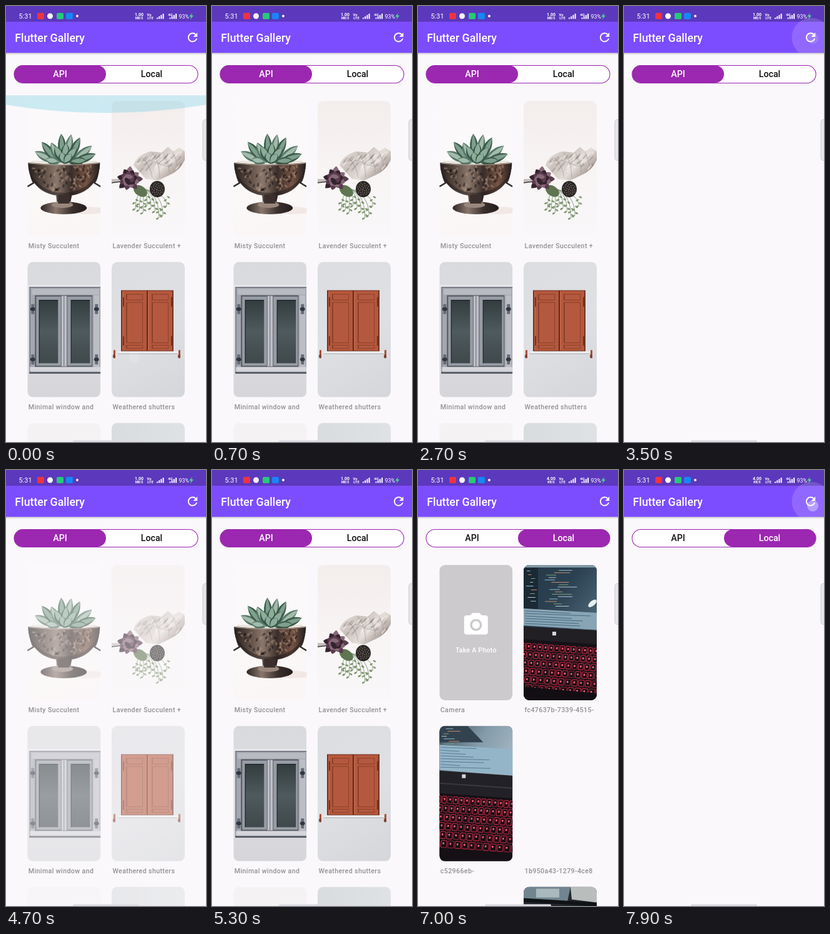
Write an HTML page with a canvas that moves like this. It is 320x693 px and loops after 8 s.

```html
<!DOCTYPE html>
<html lang="en">
<head>
<meta charset="utf-8">
<title>Flutter Gallery</title>
<style>
html, body { margin: 0; height: 100%; overflow: hidden; background: #faf8fb; }
canvas { display: block; width: 320px; height: 693px; }
</style>
</head>
<body>
<canvas id="stage"></canvas>
<script>
const LOOP = 8000, W = 320, H = 693, CARD_W = 117, CARD_H = 215;
const PURPLE = '#9c27b0', FADE = 700;
const canvas = document.getElementById('stage');
const dpr = window.devicePixelRatio || 1;
canvas.width = W * dpr;
canvas.height = H * dpr;
const ctx = canvas.getContext('2d');

const clamp = v => Math.max(0, Math.min(1, v));
const smooth = v => v * v * (3 - 2 * v);
const noise = n => { const v = Math.sin(n * 12.9898) * 43758.5453; return v - Math.floor(v); };

function rect(x, y, w, h, color, r = 0) {
  ctx.fillStyle = color;
  ctx.beginPath();
  ctx.roundRect(x, y, w, h, r);
  ctx.fill();
}
function oval(x, y, rx, ry, color, angle = 0) {
  ctx.fillStyle = color;
  ctx.beginPath();
  ctx.ellipse(x, y, rx, ry, angle, 0, 7);
  ctx.fill();
}
function shape(d, color, rule) {
  ctx.fillStyle = color;
  ctx.fill(new Path2D(d), rule || 'nonzero');
}
function line(d, color, width = 1) {
  ctx.strokeStyle = color;
  ctx.lineWidth = width;
  ctx.stroke(new Path2D(d));
}
function text(str, x, y, size, color, { weight = 500, align = 'left', spacing = 0 } = {}) {
  ctx.font = `${weight} ${size}px Roboto, sans-serif`;
  ctx.textAlign = align;
  ctx.letterSpacing = spacing + 'px';
  ctx.fillStyle = color;
  ctx.fillText(str, x, y);
}
function shade(x0, y0, x1, y1, ...colors) {
  const g = ctx.createLinearGradient(x0, y0, x1, y1);
  colors.forEach((c, i) => g.addColorStop(i / (colors.length - 1), c));
  return g;
}
function icon(d, x, y, scale, color) {
  ctx.save();
  ctx.translate(x, y);
  ctx.scale(scale, scale);
  shape(d, color, 'evenodd');
  ctx.restore();
}
function leaf(x0, y0, x1, y1, width, color) {
  const len = Math.hypot(x1 - x0, y1 - y0);
  const nx = -(y1 - y0) / len * width, ny = (x1 - x0) / len * width;
  const mx = x0 + (x1 - x0) * .6, my = y0 + (y1 - y0) * .6;
  shape(`M${x0} ${y0}Q${mx + nx} ${my + ny} ${x1} ${y1}Q${mx - nx} ${my - ny} ${x0} ${y0}`, color);
}

// Photos, each drawn inside a 117 x 215 card
function pot() {
  rect(0, 0, 117, 215, shade(0, 0, 60, 215, '#fbf9fa', '#fbf9f9', '#faf6f5'));
  oval(92, 174, 34, 6, '#f1e8e5');
  line('M3 106Q6 124 10 130L0 136M114 106Q112 124 107 130L117 136', '#332c2c', 2.5);
  rect(5, 95, 107, 6, '#e9e5df', 3);
  const tips = [[12, 80], [23, 65], [38, 66], [54, 52], [70, 53], [84, 58], [103, 71], [109, 84], [30, 92], [93, 93]];
  tips.forEach(([x, y], i) => {
    leaf(58 + (x - 58) * .25, 99, x, y, 13, i % 2 ? '#3c5a4b' : '#57796a');
    leaf(58 + (x - 58) * .32, 96, x, y + 1, 7, i % 2 ? '#7e9f8c' : '#a3bbab');
  });
  [[44, 72], [62, 67], [78, 74], [54, 82], [70, 84]].forEach(([x, y]) => {
    leaf(59, 100, x, y, 14, '#385847');
    leaf(59, 98, x, y, 9, '#8dac99');
  });
  shape('M1 98Q58 104 116 98C116 124 100 145 71 150L69 160H47L46 150C17 145 1 124 1 98Z',
    shade(0, 0, 117, 0, '#231d1e', '#57483f', '#8b786c', '#3b2e2a', '#765545', '#1f1a1b'));
  shape('M3 112Q20 145 58 146Q96 145 114 112Q104 146 71 150L69 160H47L46 150Q12 146 3 112Z', '#1c171877');
  oval(58, 170, 37, 10, shade(20, 0, 96, 0, '#2a2323', '#8a766b', '#3a302d', '#221c1d'));
  oval(56, 165, 17, 5, '#99877d');
  rect(49, 149, 18, 14, '#3a2f2c');
  for (let i = 0; i < 80; i++) {
    const y = 104 + noise(i) * 38, reach = 52 - (y - 104) * .7;
    oval(58 + (noise(i + 90) * 2 - 1) * reach, y, 3, 1.6, i % 2 ? '#c0a08a66' : '#14101177', noise(i + 200) * 3);
  }
  line('M2 99Q58 105 115 99', '#b5a195');
}
function shell() {
  rect(0, 0, 117, 215, shade(0, 0, 0, 215, '#f3edec', '#f8f4f4', '#f9f7f9'));
  shape('M35 102Q40 86 62 80L80 82 90 73 99 80 108 74 117 80V94Q108 112 92 118L75 126 55 124Z',
    shade(45, 75, 95, 125, '#e6e0dc', '#cbc2bc', '#e4ddd8', '#a3958f'));
  for (let i = 0; i < 45; i++) {
    const x = 44 + noise(i) * 66, y = 86 + noise(i + 60) * 24 + (80 - x) * .12;
    oval(x, y, 5, 1.2, i % 2 ? '#f6f1ee99' : '#83787466', 2.3);
  }
  line('M42 98Q56 90 72 98T98 102M64 82Q76 94 77 121M82 82Q92 96 92 114M98 82Q104 92 105 104M48 90Q62 101 65 122', '#80757355', 1.2);
  rect(0, 124, 17, 5, '#c6bebb');
  line('M0 130L16 128', '#3c3739', 1.5);
  for (let i = 0; i < 9; i++) {
    const x = 38 + i * 6.3, y = 162 + noise(i + 4) * 24;
    line(`M52 140Q${x} 148 ${x} ${y}`, '#71896a', .8);
    for (let k = 0; k < 4; k++) leaf(x, y - k * 5, x + (k % 2 ? 5 : -5), y - k * 5 + 3, 3, '#80986f');
  }
  oval(46, 143, 12, 8, '#5f7450', .6);
  for (let i = 0; i < 24; i++) {
    const a = i * 2.4, r = 22 - i * .65;
    leaf(28, 124, 28 + Math.cos(a) * r, 124 + Math.sin(a) * r, 10, ['#5b3c4f', '#35242f', '#876877'][i % 3]);
  }
  oval(73, 140, 12, 13, '#2c2827');
  for (let i = 0; i < 30; i++) {
    const r = Math.sqrt(i) * 1.9, a = i * 2.4;
    oval(73 + Math.cos(a) * r, 140 + Math.sin(a) * r, .8, .8, '#8d8177');
  }
}
function windowPhoto() {
  rect(0, 0, 117, 215, shade(0, 0, 0, 215, '#d9dade', '#dddde1', '#d6d6da'));
  rect(3, 39, 114, 138, '#a4a7b0');
  rect(1, 37, 116, 2.5, '#e9eaed');
  line('M3 40.5H117M4 41V176', '#666a74', 1.2);
  rect(7, 43, 108, 9, '#b9bbc3');
  rect(12, 53, 92, 114, '#54585f');
  rect(14, 55, 41, 110, '#989ca5');
  rect(63, 55, 40, 110, '#989ca5');
  rect(54, 54, 9, 112, '#bec0c8');
  line('M58.5 54V166M54 54V166M63.5 54V166', '#5e636c', .9);
  rect(106, 53, 9, 114, '#bcbec6');
  [19, 70].forEach(x => {
    rect(x, 61, 30, 100, shade(0, 61, 0, 161, '#333d40', '#4f5a5e', '#3f484b'));
    line(`M${x} 161V61H${x + 30}`, '#22292c', 1.4);
  });
  rect(4, 167, 113, 7, '#d3d5da');
  line('M3 176.5H117', '#3e424a', 2);
  [75, 155].forEach(y => [7, 109].forEach(x => {
    rect(x - 1, y - 8, 5, 16, '#666b75', 1);
    oval(x + 1.5, y, 4, 3, '#32373f');
  }));
}
function shutters() {
  rect(0, 0, 117, 215, shade(0, 0, 117, 215, '#dcdde1', '#dfe0e3', '#d4d6da'));
  rect(15, 45, 84, 98, '#6f3527');
  [17, 58].forEach(x => {
    rect(x, 46, 39, 95, '#b5573b');
    [[51, 10], [64, 65], [132, 6]].forEach(([y, h]) => {
      rect(x + 6, y, 27, h, '#8a402d');
      rect(x + 8, y + 1, 24, h - 2, '#b4593f');
    });
    line(`M${x + 1} 47V140`, '#cd8063', .7);
  });
  line('M57 46V141', '#5c2a1d', 1.5);
  [56, 118].forEach(y => [18, 95].forEach(x => rect(x, y, 2, 15, '#683528')));
  rect(10, 142, 96, 3, '#eeeeef');
  line('M10 146H106', '#afb1b6', 1);
  [3, 107].forEach(x => {
    rect(x, 140, 3, 13, '#a94f37', 1);
    oval(x + 1, 150, 2, 3, '#843f30');
  });
}
const pale = () => rect(0, 0, 117, 215, '#f4f2f3');
const grey = () => rect(0, 0, 117, 215, shade(0, 0, 117, 0, '#d9dcdf', '#dfe2e4'));

function codeLines(count, x, y, w, step, seed) {
  const colors = ['#8fb8c9', '#c58b69', '#78a178', '#b6c3cc'];
  for (let i = 0; i < count; i++) {
    const indent = noise(i + seed) * w * .4;
    rect(x + indent, y + i * step, w * (.15 + noise(i + seed + 40) * .4), 1, colors[i % 4]);
  }
}
function keyboard(top, rows, step) {
  ctx.save();
  ctx.transform(1, .07, -.12, 1, 14, top);
  for (let r = 0; r < rows; r++) {
    const w = 9 + r * .45;
    for (let k = -2; k < 14; k++) {
      rect(k * w + r * 4, r * step, w - 2, step - 3, '#1b0d14', 1.5);
      ctx.strokeStyle = (k + r) % 4 ? '#d52b47' : '#98243a';
      ctx.lineWidth = 1;
      ctx.stroke();
      rect(k * w + r * 4 + 2.5, r * step + 3, 2.5, 3, '#ef647a');
    }
  }
  ctx.restore();
}
function laptopA() {
  rect(0, 0, 117, 215, '#151217');
  shape('M0 0H117V104L0 98Z', shade(0, 0, 117, 90, '#263746', '#2b4152', '#4e6777'));
  rect(0, 0, 117, 4, '#8198a5');
  rect(0, 4, 23, 66, '#1b2934');
  codeLines(9, 2, 9, 25, 6, 8);
  codeLines(16, 28, 8, 72, 3.8, 30);
  shape('M0 69L117 76V103L0 96Z', '#89a5b5');
  for (let i = 0; i < 6; i++) line(`M2 ${73 + i * 4}L${75 + noise(i) * 35} ${77 + i * 4}`, '#44687f', 1);
  oval(110, 61, 8, 4, '#e8f1f2', -.7);
  shape('M0 98L117 104V126L0 118Z', '#211f23');
  rect(46, 106, 6, 6, '#d5d5d7');
  keyboard(125, 6, 13);
  shape('M0 193L117 204V215H0Z', '#120e13');
}
function laptopB() {
  rect(0, 0, 117, 215, '#151116');
  shape('M0 0H117V80L0 72Z', shade(0, 0, 117, 70, '#415361', '#849ba9', '#a9bcc7'));
  shape('M0 0H45L70 26H0Z', '#33424f');
  codeLines(7, 3, 4, 50, 4, 70);
  shape('M0 30L117 37V78L0 70Z', '#94b5c8');
  for (let i = 0; i < 8; i++) line(`M2 ${34 + i * 4.5}L${22 + noise(i + 6) * 60} ${36 + i * 4.5}`, '#557b93', 1);
  shape('M0 71L117 79V115L0 107Z', '#222127');
  rect(36, 77, 6, 6, '#d4d4d6');
  line('M0 91L117 99', '#3b393f', 2);
  keyboard(112, 6, 14);
  shape('M0 193L117 206V215H0Z', '#151015');
}
function laptopC() {
  rect(0, 0, 117, 215, '#25282c');
  shape('M0 0H75L70 24 0 19Z', '#718590');
  rect(20, 3, 37, 14, '#a9b9be');
  shape('M75 0H117V25L77 20Z', '#b9bebc');
  line('M0 21L117 28', '#101316', 6);
}
const CAMERA = 'M9 2L7.17 4H4c-1.1 0-2 .9-2 2v12c0 1.1.9 2 2 2h16c1.1 0 2-.9 2-2V6c0-1.1-.9-2-2-2h-3.17L15 2H9zm3 15c-2.76 0-5-2.24-5-5s2.24-5 5-5 5 2.24 5 5-2.24 5-5 5zM12 8.8a3.2 3.2 0 1 0 0 6.4a3.2 3.2 0 1 0 0-6.4z';
const REFRESH = 'M17.65 6.35C16.2 4.9 14.21 4 12 4c-4.42 0-7.99 3.58-7.99 8s3.57 8 7.99 8c3.73 0 6.84-2.55 7.73-6h-2.08c-.82 2.33-3.04 4-5.65 4-3.31 0-6-2.69-6-6s2.69-6 6-6c1.66 0 3.14.69 4.22 1.78L13 11h7V4l-2.35 2.35z';
function takePhoto() {
  rect(0, 0, 117, 215, '#cccacd');
  icon(CAMERA, 35.7, 72.5, 1.9, '#fff');
  text('Take A Photo', 58.5, 139, 10.67, '#fff', { align: 'center', spacing: .22 });
}

const API = [
  ['Misty Succulent', pot], ['Lavender Succulent +', shell],
  ['Minimal window and', windowPhoto], ['Weathered shutters', shutters],
  ['', pale], ['', grey]
];
const LOCAL = [
  ['Camera', takePhoto], ['fc47637b-7339-4515-', laptopA],
  ['c52966eb-', laptopB], ['1b950a43-1279-4ce8'],
  ['', null], ['', laptopC]
];
// Each list is shown from start to end; its photos fade in from the loaded time
const LISTS = [
  { cards: API, start: 0, loaded: -FADE, end: 3400 },
  { cards: API, start: 4300, loaded: 4300, end: 5500 },
  { cards: LOCAL, start: 5600, loaded: 6300, end: 7800 }
];
const TAPS = [{ at: 3300, y: 51, alpha: .14 }, { at: 7700, y: 57, alpha: .36 }];

function grid(cards, alpha) {
  cards.forEach(([title, photo], i) => {
    const x = i % 2 ? 169 : 34.3, y = 151 + (i >> 1) * 255.8;
    text(title, x + 1.5, y + 234, 10.67, '#929094', { spacing: .36 });
    if (!photo) return;
    ctx.save();
    ctx.translate(x, y);
    ctx.beginPath();
    ctx.roundRect(0, 0, CARD_W, CARD_H, 9);
    ctx.clip();
    photo();
    // Veiling with the page colour fades the photo as one layer
    if (photo !== takePhoto) rect(0, 0, CARD_W, CARD_H, `rgba(250,248,251,${1 - alpha})`);
    ctx.restore();
  });
}
function overscroll(t) {
  const k = 1 - smooth(clamp(t / 700));
  if (!k) return;
  const edge = 142 + 15 * k, low = 142 + 41 * k;
  shape(`M0 142H320V${edge}Q160 ${low} 0 ${edge}Z`, `rgba(70,190,215,${.26 * k})`);
  oval(205, 558, 9, 9, `rgba(255,255,255,${.15 * clamp(1 - t / 200)})`);
}
function bars(x, y) {
  for (let i = 0; i < 4; i++) rect(x + i * 3.2, y - 2 - i * 2.1, 2, 2 + i * 2.1, '#fff');
}
function statusBar(t) {
  rect(0, 0, W, 25, '#5c38bd');
  text('5:31', 20.5, 20, 10.9, '#fff', { weight: 400 });
  rect(50, 11, 11, 10, '#ef3340', 2);
  oval(70.5, 16, 4.5, 4.5, '#fff');
  rect(81, 11, 11, 10, '#28c878', 2);
  rect(96, 11, 11, 10, '#1687f5', 2);
  oval(114, 16, 2, 2, '#fff');
  const small = { weight: 700, align: 'center' };
  const [speed, unit] = t < 5700 ? ['1.00', 'MB/S'] : ['4.00', 'KB/S'];
  text(speed, 213, 16, 7, '#fff', small);
  text(unit, 213, 21.3, 5, '#fff', small);
  text('Vo', 229, 15.5, 6, '#fff', small);
  text('LTE', 231, 21, 5.8, '#fff', small);
  bars(241, 20.5);
  text('4G', 263, 16, 6, '#fff', small);
  bars(261.5, 20.5);
  text('93%', 276.5, 19.5, 8.8, '#fff', { weight: 400 });
  shape('M298 11L293 17H296L295 21.5 300 15H297Z', '#43d68a');
}
function appBar(t) {
  rect(0, 74, W, 4, shade(0, 74, 0, 78, '#0003', '#0000'));
  rect(0, 25, W, 49.5, '#7c4dff');
  statusBar(t);
  text('Flutter Gallery', 14.3, 56.5, 17.8, '#fff');
  TAPS.forEach(({ at, y, alpha }) => {
    const age = t - at;
    if (age < 0 || age > 400) return;
    const grow = 1 - (1 - clamp(age / 200)) ** 2, fade = 1 - clamp((age - 200) / 200);
    ctx.save();
    ctx.beginPath();
    ctx.rect(0, 0, W, 74.5);
    ctx.clip();
    oval(299.5, 50, 31 * grow, 31 * grow, `rgba(255,255,255,${.15 * fade})`);
    ctx.restore();
    oval(302, y, 9, 9, `rgba(255,255,255,${alpha * fade})`);
  });
  icon(REFRESH, 287.2, 38.5, .95, '#fff');
}
function toggle(pos) {
  const label = k => { const v = Math.round(17 + 238 * k); return `rgb(${v},${v},${v})`; };
  rect(13, 94.5, 294, 28, '#fff', 14);
  rect(13 + 147 * pos, 94.5, 147, 27.5, PURPLE, 14);
  ctx.strokeStyle = PURPLE;
  ctx.lineWidth = 1.1;
  ctx.beginPath();
  ctx.roundRect(13, 94.5, 294, 28, 14);
  ctx.stroke();
  text('API', 86.5, 113, 14.2, label(1 - pos), { align: 'center' });
  text('Local', 233, 113, 14.2, label(pos), { align: 'center' });
}
function render(t) {
  ctx.setTransform(dpr, 0, 0, dpr, 0, 0);
  rect(0, 0, W, H, '#faf8fb');
  const list = LISTS.find(l => t >= l.start && t < l.end);
  if (list) grid(list.cards, clamp((t - list.loaded) / FADE));
  overscroll(t);
  appBar(t);
  toggle(smooth(clamp((t - 5400) / 300)));
  rect(314.5, 180, 12, 66, '#c9c8cc', 5);
  rect(315.5, 181, 12, 64, '#e7e6e9', 4);
  rect(107, 690.3, 106, 4, '#dddce4', 2);
}
function tick() {
  render(performance.now() % LOOP);
  requestAnimationFrame(tick);
}
tick();
</script>
</body>
</html>
```
